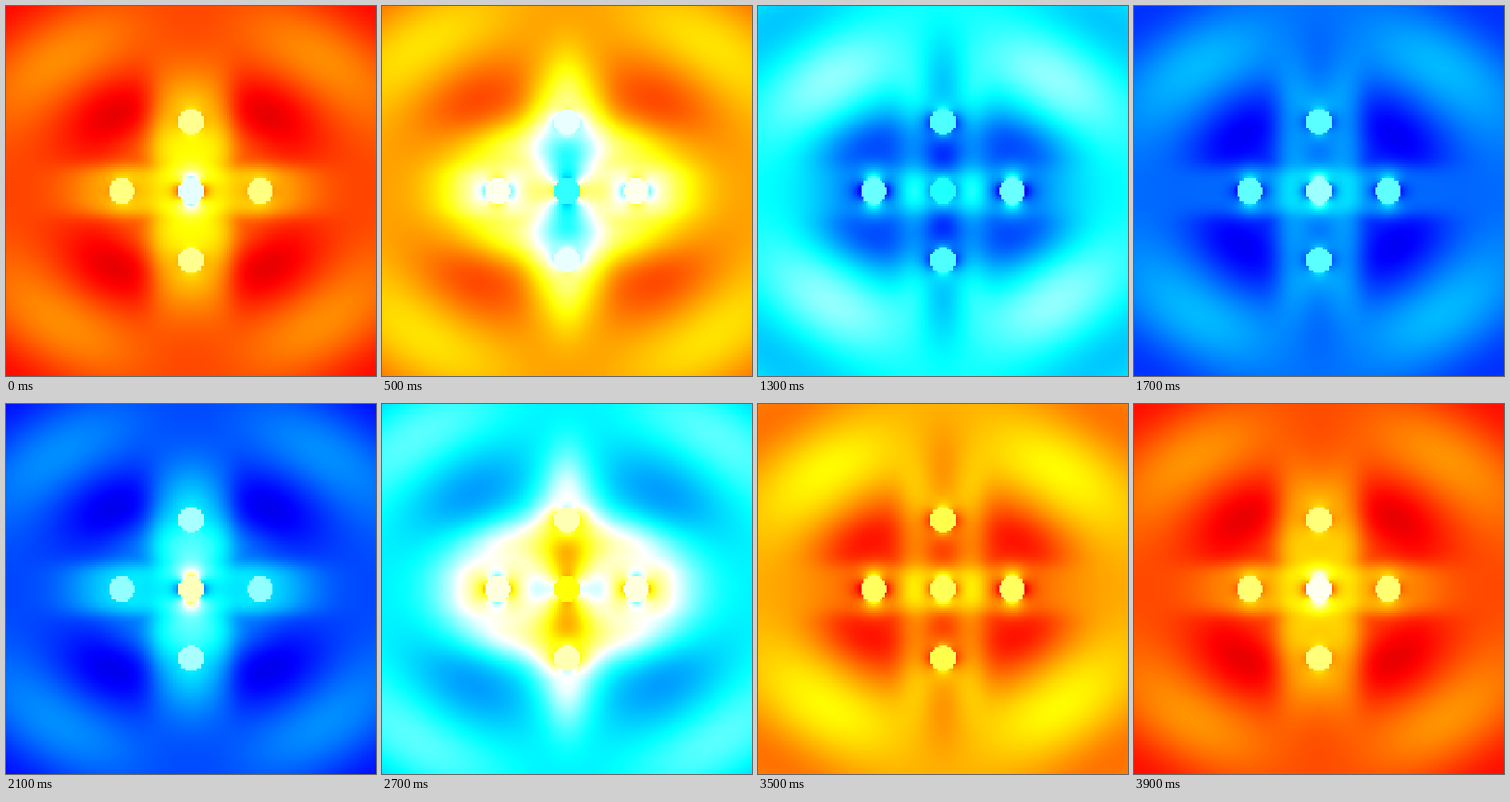
These frames come from a looping animation (400 px wide and 400 px high, 4000 ms). An HTML page with a canvas:

```html
<!DOCTYPE html>
<html lang="en">
<head>
<meta charset="utf-8">
<title>Oscillating field around five discs</title>
<style>
html, body { margin: 0; width: 100%; height: 100%; overflow: hidden; background: #f50; }
canvas { display: block; width: 400px; height: 400px; image-rendering: pixelated; }
</style>
</head>
<body>
<canvas id="view" width="161" height="161"></canvas>
<script>
const N = 161, MID = 80, CELL = 400 / N, GAP = 75, RADIUS = 13.8;
const PERIOD = 4000, STEP = 100;

// Discs: value inside and dipole strength, each for the cosine and sine parts
const core = { cos: -.05, sin: -.52, dipCos: 130, dipSin: 0 };
const side = { cos: .25, sin: -.2, dipCos: 20, dipSin: -130 };
const pole = { cos: .22, sin: -.28, dipCos: 20, dipSin: -75 };
const discs = [{ x: 0, y: 0, ...core }];
for (const s of [-GAP, GAP]) discs.push({ x: s, y: 0, ...side }, { x: 0, y: s, ...pole });

// Soft-edged box and bell profiles
const flat = (x, w) => Math.exp(-((x / w) ** 4));
const bell = (x, w) => Math.exp(-((x / w) ** 2));

// Outgoing wave that is strong along the diagonals
function ripple(x, y) {
  const rho = Math.hypot(.82 * x, y) || 1;
  const diagonal = (2 * x * y / (x * x + y * y || 1)) ** 2;
  const size = .31 * diagonal * (1 - flat(rho, 75)) * Math.sqrt(108 / rho);
  const phase = 2 * Math.PI * (rho - 108) / 155;
  return [size * Math.cos(phase), size * Math.sin(phase)];
}

function fieldAt(x, y) {
  const [rippleCos, rippleSin] = ripple(x, y);
  const arm = .52 * flat(x, 126) * flat(y, 28);
  const column = .54 * flat(x, 46) * flat(y, 125);
  let a = 1.12 - Math.hypot(arm, column) + rippleCos;

  const blob = .72 * flat(x, 135) * flat(y, 68);
  const spine = .65 * bell(x, 24) * flat(y, 145);
  const notch = .75 * flat(x, 52) * bell(y, 28);
  let b = .04 - blob - spine + notch + rippleSin;

  for (const d of discs) {
    const dx = x - d.x, dy = y - d.y, r2 = dx * dx + dy * dy;
    if (r2 < RADIUS * RADIUS) return [d.cos, d.sin];
    const k = (dx * dx - dy * dy) / (r2 * r2);
    a += d.dipCos * k;
    b += d.dipSin * k;
  }
  return [a, b];
}

const cosPart = new Float32Array(N * N), sinPart = new Float32Array(N * N);
for (let j = 0; j < N; j++) {
  for (let i = 0; i < N; i++) {
    const k = j * N + i;
    [cosPart[k], sinPart[k]] = fieldAt((i - MID) * CELL, (j - MID) * CELL);
  }
}

const ctx = document.getElementById("view").getContext("2d");
const image = ctx.createImageData(N, N);
const px = image.data;
const ramp = (m, from, to) => 255 * Math.min(1, Math.max(0, (to - m) / (to - from)));

function draw(phase) {
  const c = Math.cos(phase), s = Math.sin(phase);
  for (let k = 0; k < N * N; k++) {
    const v = cosPart[k] * c + sinPart[k] * s, m = Math.abs(v), p = k * 4;
    // white, yellow, red, black; the negative side swaps red and blue
    const strong = ramp(m, 1.35, 2.2), weak = ramp(m, 0, .5);
    px[p] = v > 0 ? strong : weak;
    px[p + 1] = ramp(m, .5, 1.35);
    px[p + 2] = v > 0 ? weak : strong;
    px[p + 3] = 255;
  }
  ctx.putImageData(image, 0, 0);
}

const start = performance.now();
let last = -1;
function tick() {
  const t = (performance.now() - start) % PERIOD;
  const step = Math.floor(t / STEP);
  if (step !== last) {
    last = step;
    draw(step * STEP / PERIOD * 2 * Math.PI);
  }
  requestAnimationFrame(tick);
}
tick();
</script>
</body>
</html>
```
